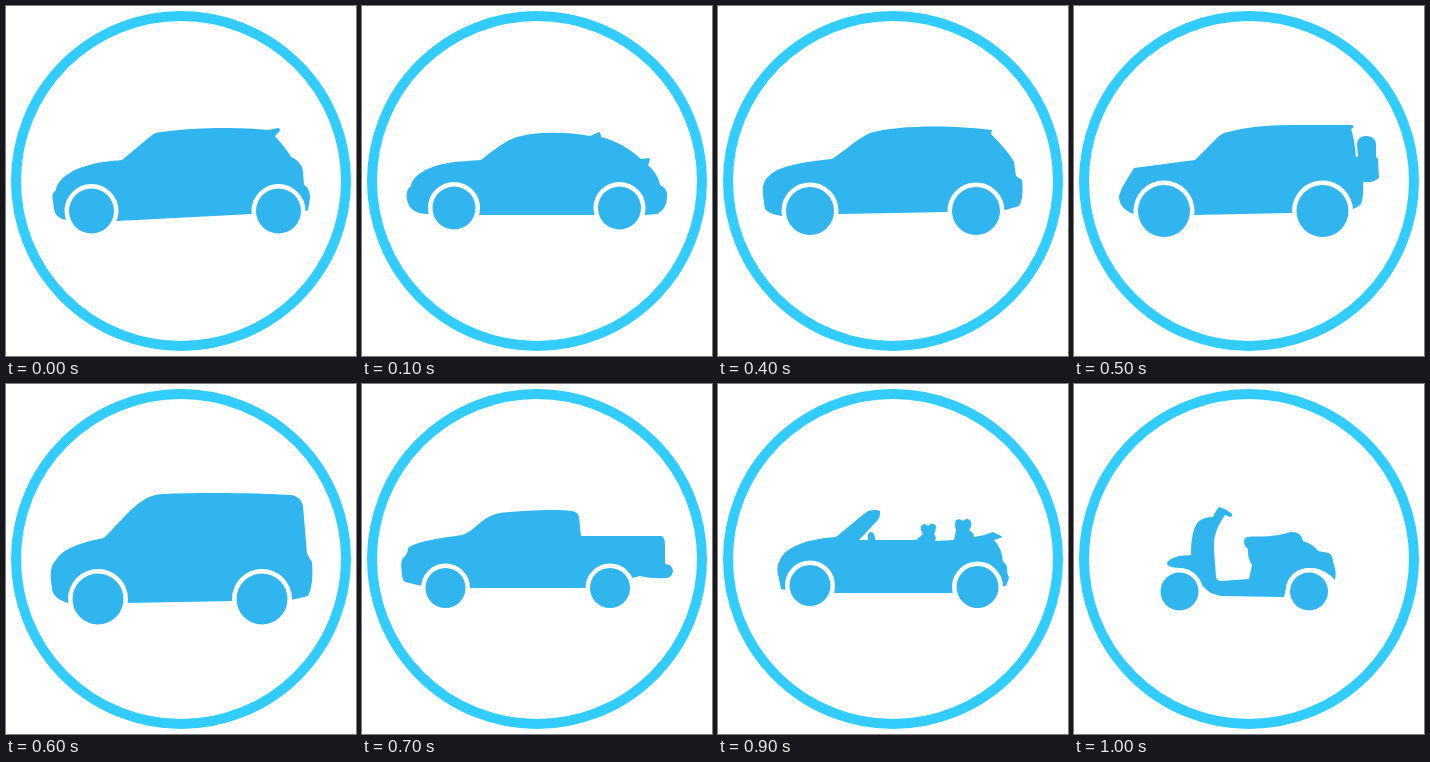
These frames come from a looping animation (350 px wide and 350 px high, 1.1 s). An HTML page:

```html
<!DOCTYPE html>
<html lang="en">
<head>
<meta charset="utf-8">
<title>Vehicles</title>
<style>
  html, body { margin: 0; width: 100%; height: 100%; overflow: hidden; background: #fff; }
  svg { display: block; width: 100vw; height: 100vh; overflow: hidden; }
  .ring { fill: none; stroke: #33ccff; stroke-width: 10; }

  /* Vehicles are stacked one stage apart and the strip jumps past them. */
  .strip { fill: #30b5ee; animation: next 1100ms steps(11, end) infinite; }
  .strip g { transform: translateY(calc(var(--i) * 350px)); }
  .strip circle { stroke: #fff; stroke-width: 9; paint-order: stroke; }
  @keyframes next { to { transform: translateY(-3850px); } }
</style>
</head>
<body>
<svg viewBox="0 0 350 350">
  <g class="strip">
    <!-- small hatchback -->
    <g style="--i:0">
      <path d="M47 196C46 190 46 187 50 184C51 175 62 165 80 160C92 156 105 155 116 154L146 129Q150 126 156 126C190 121 235 121 262 124L272 122Q276 123 272 127L269 130C274 136 282 145 285 151C291 153 296 159 297 165C297 170 298 176 298 179C302 180 304 187 304 192L302 204L298 206L246 208L111 215L60 214Q49 212 48 203Z"/>
      <circle cx="85.5" cy="205" r="22.5"/><circle cx="272.5" cy="205" r="22.5"/>
    </g>
    <!-- coupe -->
    <g style="--i:1">
      <path d="M46 197C43 188 45 183 49 180C50 170 66 160 86 157C98 155 110 155 119 154C128 147 140 137 152 132C170 126 200 125 228 130L237 126Q239 127 239 131C255 135 268 143 279 153L287 152Q289 153 286 159C293 166 297 172 298 179C303 181 306 186 305 190C305 198 302 205 295 208L283 209L118 209L66 208Q50 208 46 197Z"/>
      <circle cx="92" cy="202" r="21.5"/><circle cx="257.5" cy="202" r="21.5"/>
    </g>
    <!-- sedan -->
    <g style="--i:2">
      <path d="M45 190C44 182 47 177 51 174C60 163 85 158 115 156C130 147 146 135 160 131C185 126 212 127 228 132C243 137 253 145 264 152L296 155Q300 158 299 165L305 176Q306 192 302 198L285 204L120 206L70 207Q52 206 47 202Z"/>
      <circle cx="94" cy="202" r="21.5"/><circle cx="258" cy="202" r="21.5"/>
    </g>
    <!-- estate -->
    <g style="--i:3">
      <path d="M44 184C43 178 47 174 51 171C60 161 85 155 114 155C130 147 150 136 167 130Q175 127 185 127C215 126 250 129 277 132L277 136C286 142 295 148 300 154L301 169L306 172Q307 190 304 196Q300 200 286 202L123 203L72 208Q55 206 47 202Z"/>
      <circle cx="97" cy="201" r="21.5"/><circle cx="260" cy="201" r="21.5"/>
    </g>
    <!-- crossover -->
    <g style="--i:4">
      <path d="M45 190C44 180 46 174 51 170C60 160 85 156 114 153C128 144 140 132 152 127C180 119 235 119 274 124L273 128C283 138 291 147 296 156L298 170L304 174Q306 192 301 200L284 205L122 208L64 210Q50 208 47 203Z"/>
      <circle cx="92" cy="205" r="24"/><circle cx="258" cy="205" r="24"/>
    </g>
    <!-- off-roader -->
    <g style="--i:5">
      <path d="M60 162L121 154L144 131Q148 127 154 126Q180 119 215 119L278 119Q282 121 277 123C280 132 281 140 282 151L284 151L283 138Q284 130 292 130Q301 130 302 138L302 151L304 153L305 172Q300 177 289 176Q290 190 287 198Q283 202 279 203L218 207L120 209L60 208Q45 203 45 190Q47 182 52 175Z"/>
      <circle cx="90" cy="205" r="26"/><circle cx="248.5" cy="205" r="26"/>
    </g>
    <!-- van -->
    <g style="--i:6">
      <path d="M45 196C44 186 46 180 50 176C56 165 76 158 98 154C112 140 124 125 136 117Q144 111 156 110C200 108 255 109 286 111Q295 113 297 122L301 170L306 178Q308 200 302 212L285 216L118 219L62 219Q48 215 46 206Z"/>
      <circle cx="92" cy="215" r="25.5"/><circle cx="256" cy="215" r="25.5"/>
    </g>
    <!-- pickup -->
    <g style="--i:7">
      <path d="M40 190Q38 178 41 174Q46 170 46 164C55 157 80 154 100 151C115 146 118 133 138 129C165 126 195 125 210 127Q216 128 217 133L219 152L300 152Q303 154 303 162L303 180Q310 180 311 187Q310 194 304 194Q290 195 278 192L270 194L225 204L108 204L60 202L43 198Q40 195 40 190Z"/>
      <circle cx="83.5" cy="204" r="20"/><circle cx="248" cy="204" r="20"/>
    </g>
    <!-- minivan -->
    <g style="--i:8">
      <path d="M46 192C45 182 48 177 53 172C64 161 84 155 106 151C122 140 136 129 150 124C185 117 240 118 275 123Q284 126 288 137L296 160L302 174Q304 194 299 202L284 206L118 209L64 209Q49 206 47 200Z"/>
      <circle cx="91" cy="204" r="21.5"/><circle cx="258" cy="204" r="21.5"/>
    </g>
    <!-- convertible -->
    <g style="--i:9">
      <path d="M63 205L60 190Q58 182 62 176C66 165 85 155 118 153C130 143 143 132 150 127Q158 125 162 127Q163 133 158 138L141 156L150 156Q149 148 153 148Q157 148 157 156L198 156L205 150Q202 146 203 142Q206 138 210 142Q215 137 218 142Q218 147 216 150Q219 153 217 157L236 156L238 146Q236 140 238 136Q242 134 245 137Q250 132 253 138Q254 143 251 146Q256 149 256 153Q266 152 275 148L285 153L276 156Q284 164 285 178Q290 180 289 188L291 194L288 202L284 202L235 209L116 209L68 206Z"/>
      <circle cx="92" cy="201.5" r="20.5"/><circle cx="259.5" cy="203" r="21"/>
    </g>
    <!-- scooter -->
    <g style="--i:10">
      <path d="M93 180Q93 175 105 172L117 171C117 155 119 143 125 137Q131 133 139 133Q142 126 145 123Q150 124 157 129Q160 132 156 133L151 131C145 140 139 150 140 165L142 193Q143 197 147 197L175 195L178 181Q173 173 174 165Q168 161 171 154Q173 152 180 152.5C195 153 208 151 216 148Q227 147 229 157Q239 160 244 167L255 169Q259 172 259 178Q263 188 261 196Q252 186 240 184Q215 183 212 205L210 213L147 212Q133 210 126 198Q120 186 107 184Q95 184 93 180Z"/>
      <circle cx="105.5" cy="207.5" r="19"/><circle cx="235" cy="207.5" r="19"/>
    </g>
  </g>
  <circle class="ring" cx="175" cy="175" r="165"/>
</svg>
</body>
</html>
```
